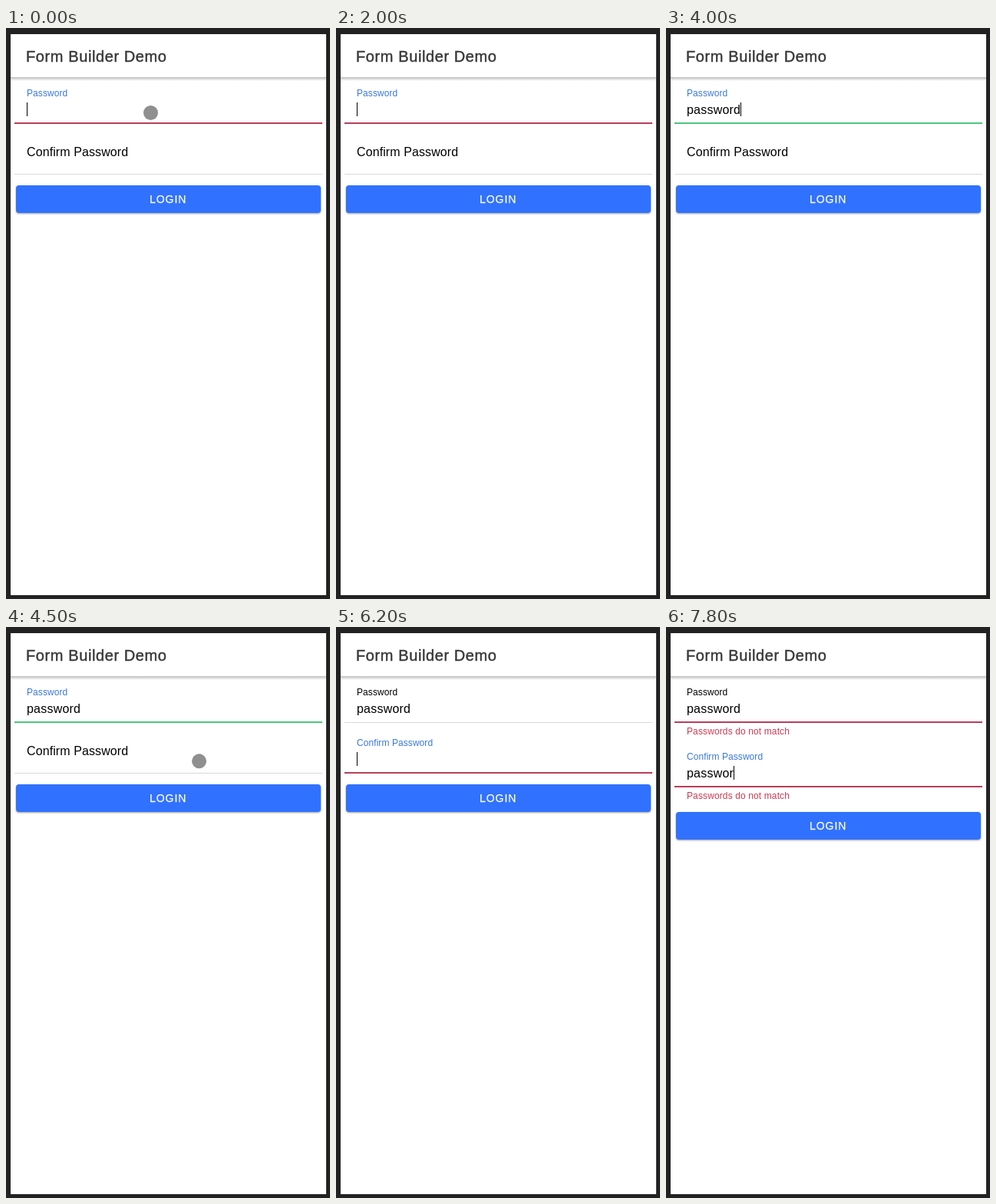
These frames come from a looping animation (422x744 px, 8000 ms). An HTML page:

```html
<!DOCTYPE html>
<html lang="en">
<head>
<meta charset="utf-8">
<title>Form Builder Demo</title>
<style>
  html, body { margin: 0; width: 100%; height: 100%; overflow: hidden; background: #222; }
  svg { display: block; font: 16px "Liberation Sans", Arial, sans-serif; }
  .label { letter-spacing: .006em; }
  .value { letter-spacing: .013em; }
  .error { font-size: 12px; letter-spacing: .01em; fill: #cd3a50; }
  .title { font-size: 20px; letter-spacing: .6px; fill: #383838; stroke: #383838; stroke-width: .45; }
  .button { filter: drop-shadow(0 1px 1px rgba(0, 0, 0, .4)); }
  .login { font-size: 14px; letter-spacing: .95px; fill: #fff; stroke: #fff; stroke-width: .25; }
</style>
</head>
<body>
<svg width="422" height="744" viewBox="0 0 422 744">
  <defs>
    <linearGradient id="shade" x2="0" y2="1">
      <stop stop-color="#bdbdbd"/>
      <stop offset="1" stop-color="#fff"/>
    </linearGradient>
  </defs>
  <rect width="422" height="744" fill="#222"/>
  <rect x="6" y="8" width="411" height="731" fill="#fff"/>
  <rect x="6" y="64" width="411" height="5" fill="url(#shade)"/>
  <text class="title" x="26" y="44">Form Builder Demo</text>

  <text class="label" id="label1" x="27" y="89" font-size="12">Password</text>
  <text class="value" id="value1" x="27" y="112"></text>
  <rect id="line1" x="11" width="401"/>
  <text class="error" x="27" y="140">Passwords do not match</text>

  <g id="second">
    <text class="label" id="label2" x="27">Confirm Password</text>
    <text class="value" id="value2" x="27" y="178"></text>
    <rect id="line2" x="11" width="401"/>
    <text class="error" x="27" y="206">Passwords do not match</text>
  </g>

  <g id="login">
    <rect class="button" x="13" y="205" width="397" height="36" rx="4" fill="#3072ff"/>
    <text class="login" x="187" y="228">LOGIN</text>
  </g>
  <rect id="caret" width="1" height="18"/>
  <circle id="pointer" r="9.5" fill="#8f8f8f"/>
</svg>
<script>
const LOOP = 8000, STEP = 100, BLINK = 500;
const FOCUS = 4900, MISMATCH = 6400;
const RED = '#b93f58', GREEN = '#4dc67f', GRAY = '#d9d9d9';
const KEYS1 = [2100, 2200, 2700, 2900, 3100, 3200, 3500, 3700];
const KEYS2 = [6400, 6600, 6800, 7000, 7200, 7500, 7800];

const $ = id => document.getElementById(id);
const clamp = v => Math.max(0, Math.min(1, v));
const smooth = v => v * v * (3 - 2 * v);
const set = (id, attrs) => {
  for (const name in attrs) $(id).setAttribute(name, attrs[name]);
};
const show = (el, on) => el.setAttribute('visibility', on ? 'visible' : 'hidden');
const blue = k => `rgb(${58 * k},${120 * k},${218 * k})`;

function type(id, keys, t) {
  const count = keys.filter(k => k <= t).length;
  $(id).textContent = 'password'.slice(0, count);
  return count;
}

function line(id, bottom, color) {
  const height = color === GRAY ? 1 : 2;
  set(id, { y: bottom - height, height, fill: color });
}

function drawCaret(t, field, top) {
  // Blinking restarts at each key press and at focus.
  const start = Math.max(-400, ...[...KEYS1, FOCUS, ...KEYS2].filter(k => k <= t));
  const text = $(field);
  const width = text.textContent ? text.getComputedTextLength() : 0;
  set('caret', { x: Math.floor(27 + width), y: top });
  show($('caret'), Math.floor((t - start) / BLINK) % 2 === 0);
}

function drawPointer(t) {
  const k = 1 - (1 - clamp((t - 4000) / 700)) ** 2;
  const first = t < 1000;
  set('pointer', {
    cx: first ? 188.5 : 432 - 196.5 * k,
    cy: first ? 110.5 : 190 - 16.5 * k
  });
  show($('pointer'), first || (t > 4000 && t < 6100));
}

function draw(t) {
  const onSecond = t >= FOCUS, mismatch = t >= MISMATCH;
  const float = smooth(clamp((t - 4838) / 150)) * onSecond;
  const shift = mismatch ? 18 : 0;

  const typed = type('value1', KEYS1, t);
  type('value2', KEYS2, t);
  set('label1', { fill: blue(1 - float) });
  set('label2', { fill: blue(float), 'font-size': 16 - 4 * float, y: 167 - 12 * float });

  line('line1', 125, mismatch ? RED : onSecond ? GRAY : typed ? GREEN : RED);
  line('line2', 191, onSecond ? RED : GRAY);
  document.querySelectorAll('.error').forEach(el => show(el, mismatch));
  set('second', { transform: `translate(0 ${shift})` });
  set('login', { transform: `translate(0 ${2 * shift})` });

  drawCaret(t, onSecond ? 'value2' : 'value1', onSecond ? 163 + shift : 97);
  drawPointer(t);
}

const begin = performance.now();
function tick() {
  const t = (performance.now() - begin) % LOOP;
  draw(Math.floor(t / STEP) * STEP);
  requestAnimationFrame(tick);
}
tick();
</script>
</body>
</html>
```
